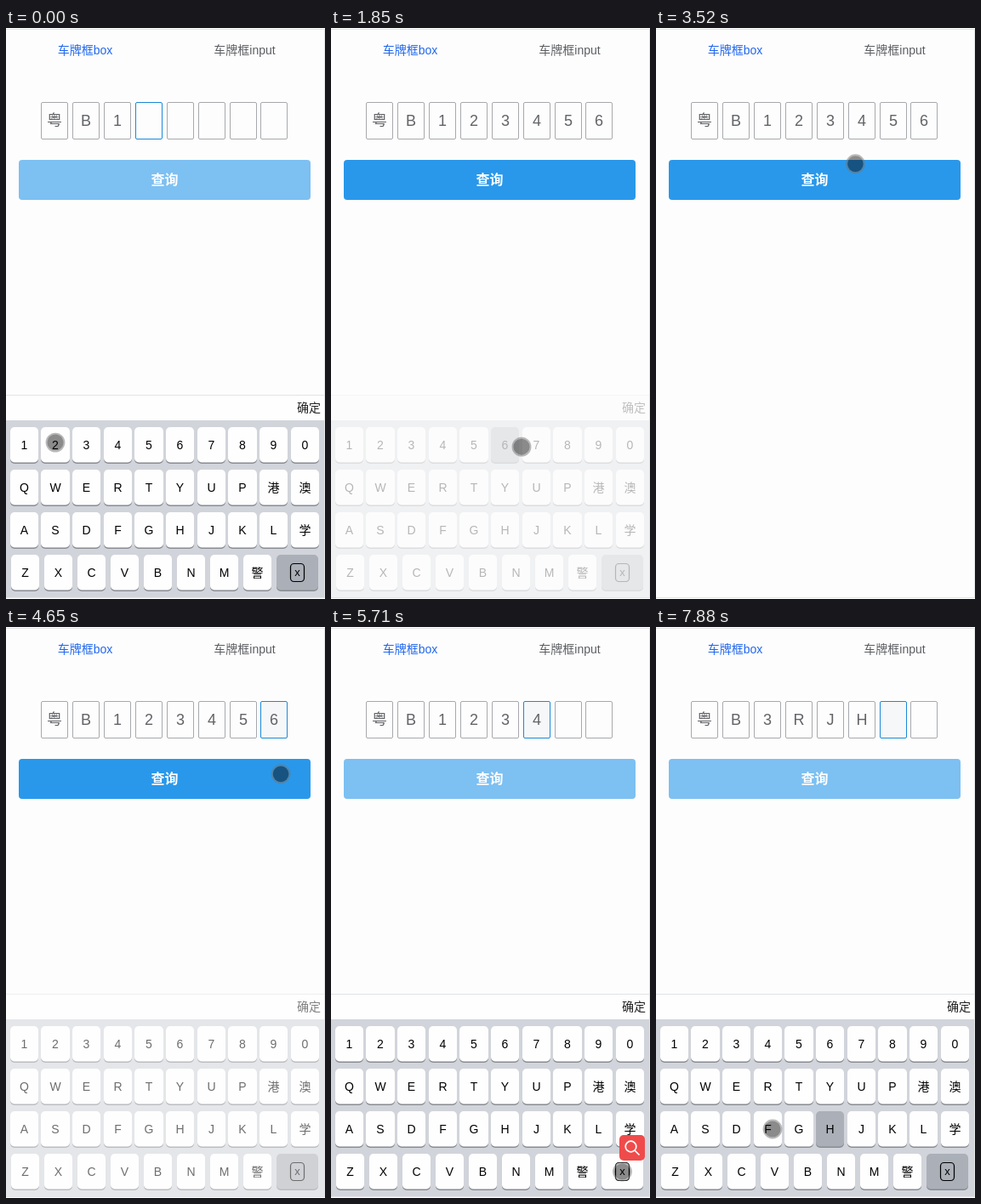
Write an HTML page with a canvas that moves like this. It is 375 by 671 pixels and loops after 8 s.

```html
<!DOCTYPE html>
<html lang="zh-CN">
<head>
<meta charset="utf-8">
<title>车牌键盘</title>
<style>
  html, body { margin: 0; width: 100%; height: 100%; overflow: hidden; background: #fdfdfd; }
  canvas { display: block; width: 375px; height: 671px; }
</style>
</head>
<body>
<canvas id="stage"></canvas>
<script>
const W = 375, H = 671, LOOP = 8000;
const FONT = '"Liberation Sans", Arial, "Noto Sans CJK SC", "Noto Sans CJK", sans-serif';
const BG = '#fdfdfd', LINE = '#e2e3e5';
const BACK = '<', PICK = '*';
const LIT_MS = 160, FADE_MS = 195;

const canvas = document.getElementById('stage');
const ctx = canvas.getContext('2d');
const dpr = window.devicePixelRatio || 1;
canvas.width = W * dpr;
canvas.height = H * dpr;

const clamp = v => Math.max(0, Math.min(1, v));
const easeOut = k => 1 - (1 - k) ** 3;
const cellX = i => Math.ceil(41 + i * 36.855);

// Keyboard layout: edges snap to whole pixels
const keys = ['1234567890', 'QWERTYUP港澳', 'ASDFGHJKL学', 'ZXCVBNM警' + BACK].flatMap((row, r) =>
  [...row].map((ch, i) => {
    const left = r < 3 ? 4.8 + i * 36.66 : 6 + i * 39;
    const x = Math.round(left);
    const w = ch === BACK ? 49 : Math.round(left + 33.3) - x;
    return { ch, x, y: 469 + r * 50, w };
  }));

// Each run taps its keys at an even pace
const run = (from, gap, chars) => [...chars].map((ch, i) => ({ t: from + i * gap, ch }));
const taps = [
  ...run(130, 395, '23456'),
  ...run(4540, 0, PICK),
  ...run(5450, 235, BACK.repeat(5)),
  ...run(6950, 270, '3RJH')
];

function tapPoint({ t, ch }) {
  if (ch === PICK) return { t, x: cellX(7) + 16, y: 113 };
  const key = keys.find(k => k.ch === ch);
  return { t, x: key.x + key.w / 2, y: key.y + 21 };
}

// The pointer visits every tap and a few places in between
const stops = [
  { t: 0, x: 58, y: 487 },
  { t: 1850, x: 224, y: 493 },
  { t: 2940, x: 222, y: 184 },
  { t: 3520, x: 234, y: 160 },
  { t: 4090, x: 315, y: 113 },
  { t: 4650, x: 323, y: 171 },
  { t: 6670, x: 271, y: 610 },
  { t: 7880, x: 137, y: 590 },
  ...taps.map(tapPoint)
].sort((a, b) => a.t - b.t);

function pointerAt(t) {
  const next = stops.findIndex(s => s.t > t);
  if (next < 0) return stops[stops.length - 1];
  const a = stops[next - 1], b = stops[next];
  const k = easeOut((t - a.t) / (b.t - a.t));
  return { x: a.x + (b.x - a.x) * k, y: a.y + (b.y - a.y) * k };
}

function stateAt(t) {
  const s = { cells: [...'粤B1', '', '', '', '', ''], active: 3, lit: '', alpha: 1, picked: false, wiping: false };
  for (const { t: at, ch } of taps) {
    if (at > t) break;
    const fade = clamp((t - at) / FADE_MS);
    if (ch === PICK) {
      s.active = 7;
      s.alpha = fade;
      s.picked = true;
    } else if (ch === BACK) {
      s.cells[s.active--] = '';
    } else {
      s.cells[s.active++] = ch;
      if (s.active === s.cells.length) s.alpha = 1 - fade;
    }
    s.wiping = ch === BACK;
    s.lit = t - at < LIT_MS ? ch : '';
  }
  return s;
}

function text(str, x, y, size, color, align = 'center', weight = 'normal') {
  ctx.font = `${weight} ${size}px ${FONT}`;
  ctx.textAlign = align;
  ctx.fillStyle = color;
  ctx.fillText(str, x, y);
}

function rect(x, y, w, h, color) {
  ctx.fillStyle = color;
  ctx.fillRect(x, y, w, h);
}

function box(x, y, w, h, r, color) {
  ctx.beginPath();
  ctx.roundRect(x, y, w, h, r);
  ctx.fillStyle = color;
  ctx.fill();
}

function outline(x, y, w, h, r, color, width = 1) {
  ctx.beginPath();
  ctx.roundRect(x + 0.5, y + 0.5, w - 1, h - 1, r);
  ctx.strokeStyle = color;
  ctx.lineWidth = width;
  ctx.stroke();
}

function drawKey({ ch, x, y, w }, lit) {
  // The grey backspace key turns white when pressed, the others turn grey
  const grey = (ch === BACK) !== (ch === lit);
  const mid = x + w / 2;
  box(x, y + 2, w, 41, 5, '#888b91');
  box(x, y, w, 41.5, 5, grey ? '#abafb7' : '#fefefe');
  if (ch === BACK) {
    outline(mid - 8.5, y + 10, 17, 22, 4, '#000', 1.2);
    text('x', mid, y + 25, 13, '#000');
  } else {
    text(ch, mid, y + 26, 14, '#000');
  }
}

function drawKeyboard(lit, alpha) {
  rect(0, 431, W, 1, LINE);
  rect(0, 432, W, 29, '#fefefe');
  text('确定', 370, 451, 14, '#222', 'right');
  rect(0, 461, W, 209, '#d1d4da');
  keys.forEach(key => drawKey(key, lit));

  // Fade the whole panel towards the page colour
  ctx.globalAlpha = 1 - alpha;
  rect(0, 431, W, 240, BG);
  ctx.globalAlpha = 1;
}

function drawSearch() {
  box(339, 597, 30, 30, 5, '#f04b4b');
  ctx.strokeStyle = '#fff';
  ctx.lineWidth = 1.7;
  ctx.beginPath();
  ctx.arc(352.5, 610.5, 6.3, 0, Math.PI * 2);
  ctx.moveTo(357, 615);
  ctx.lineTo(362.5, 620.5);
  ctx.stroke();
}

function drawPointer({ x, y }) {
  ctx.beginPath();
  ctx.arc(x, y, 9.5, 0, Math.PI * 2);
  ctx.fillStyle = 'rgba(0,0,0,.45)';
  ctx.fill();
  ctx.beginPath();
  ctx.arc(x, y, 10.3, 0, Math.PI * 2);
  ctx.strokeStyle = 'rgba(115,115,115,.5)';
  ctx.lineWidth = 2.2;
  ctx.stroke();
}

function draw(t) {
  const { cells, active, lit, alpha, picked, wiping } = stateAt(t);
  ctx.setTransform(dpr, 0, 0, dpr, 0, 0);
  rect(0, 0, W, H, BG);

  text('车牌框box', 93, 31, 14, '#2167ee');
  text('车牌框input', 280.5, 31, 14, '#5c5e62');

  cells.forEach((ch, i) => {
    const x = cellX(i), on = i === active;
    if (on && picked) box(x, 87, 32, 44, 2, '#f6f7f8');
    outline(x, 87, 32, 44, 1.5, on ? '#1989d8' : '#a8a9ad');
    text(ch, x + 16, 115, 18, '#626367');
  });

  const ready = cells.filter(Boolean).length >= 7;
  box(15, 155, 343, 47, 4, ready ? '#2998eb' : '#7dc0f2');
  text('查询', 186.5, 184, 16, '#fff', 'center', 'bold');

  if (alpha > 0) drawKeyboard(lit, alpha);

  rect(0, 1, W, 1, LINE);
  rect(374, 1, 1, 669, LINE);
  rect(0, 669, W, 1, LINE);

  drawPointer(pointerAt(t));
  if (wiping) drawSearch();
}

function loop() {
  draw(performance.now() % LOOP);
  requestAnimationFrame(loop);
}
loop();
</script>
</body>
</html>
```
